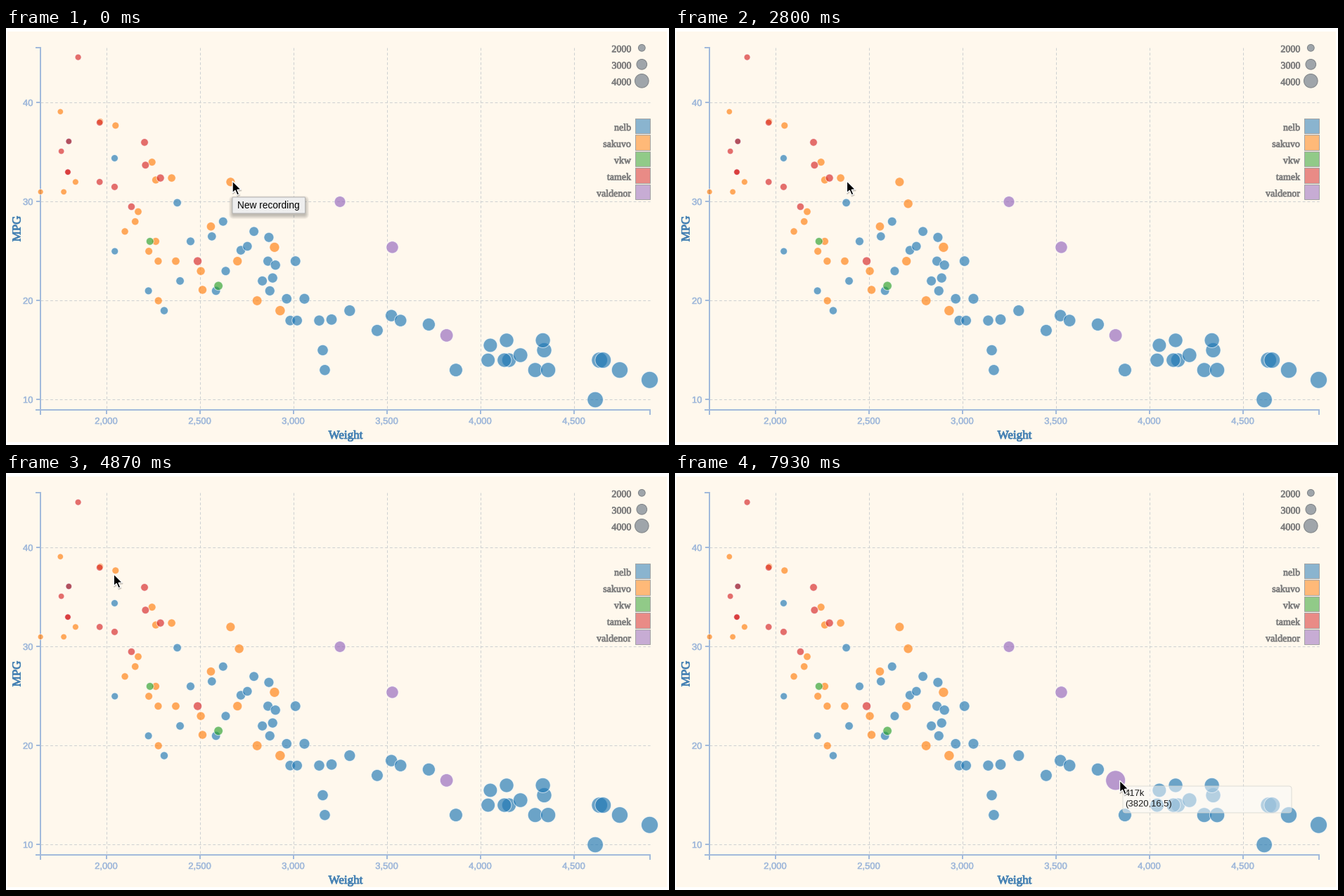
Recreate the animation shown at these times as a matplotlib script. Size 943 px wide and 594 px high, loop 8 s.

```python
import numpy as np
import matplotlib.pyplot as plt
from matplotlib.animation import FuncAnimation
from matplotlib.patches import Circle, FancyBboxPatch, Polygon, Rectangle
from matplotlib.patheffects import Normal, Stroke

W, H = 943, 594
LOOP, STEP = 8000, 50
AXIS, GRID, TITLE, GREY = "#a2badb", "#cdd0d1", "#4682b4", "#808080"
SANS, SERIF = "Liberation Sans", "Liberation Serif"
BLUE, ORANGE, GREEN, RED, PURPLE = "#1f77b4", "#ff7f0e", "#2ca02c", "#d62728", "#9467bd"

# (weight, mpg) per maker
nelb = [
    (1800, 36.1), (2045, 34.4), (2046, 25), (2226, 21), (2310, 19), (2380, 29.9),
    (2395, 22), (2451, 26), (2565, 26.5), (2587, 21), (2625, 28), (2639, 23),
    (2720, 25.1), (2755, 25.5), (2790, 27), (2865, 24), (2870, 26.4), (2835, 22),
    (2875, 21), (2890, 22.3), (2905, 23.6), (3012, 24), (2965, 20.2), (3060, 20.2),
    (2984, 18), (3021, 18), (3139, 18), (3205, 18.1), (3302, 19), (3158, 15),
    (3169, 13), (3449, 17), (3525, 18.5), (3574, 18), (3725, 17.6), (3870, 13),
    (4042, 14), (4054, 15.5), (4141, 16), (4154, 14), (4129, 14), (4215, 14.5),
    (4294, 13), (4363, 13), (4342, 15), (4335, 16), (4638, 14), (4657, 14),
    (4746, 13), (4615, 10), (4906, 12),
]
sakuvo = [
    (1755, 39.1), (1968, 38.1), (2050, 37.7), (1836, 32), (1773, 31), (1649, 31),
    (2245, 34), (2265, 32.2), (2350, 32.4), (2665, 32), (2711, 29.8), (2171, 29),
    (2155, 28), (2100, 27), (2265, 26), (2228, 25), (2278, 24), (2279, 20),
    (2372, 24), (2506, 23), (2560, 27.5), (2515, 21.1), (2702, 24), (2900, 25.4),
    (2807, 20), (2930, 19),
]
vkw = [(2234, 26), (2600, 21.5)]
tamek = [
    (1850, 44.6), (1965, 38), (1800, 36.1), (1760, 35.1), (1795, 33), (1795, 33),
    (1965, 32), (2045, 31.5), (2205, 36), (2210, 33.7), (2290, 32.4), (2135, 29.5),
    (2489, 24),
]
valdenor = [(3250, 30), (3530, 25.4), (3820, 16.5)]

makers = [("nelb", BLUE, nelb), ("sakuvo", ORANGE, sakuvo), ("vkw", GREEN, vkw),
          ("tamek", RED, tamek), ("valdenor", PURPLE, valdenor)]
cars = [(w, m, color) for _, color, rows in makers for w, m in rows]

# start, end, car, label, tooltip corner
hovers = [
    (2850, 3500, (2350, 32.4), "pimelle", (257, 231)),
    (5100, 5750, (1965, 38), "tarno", (154, 150)),
    (7540, 9000, (3820, 16.5), "417k", (637, 446)),
]
# time, x, y of the pointer tip
path = [
    (0, 321.5, 217), (870, 321.5, 217), (1330, 328, 214), (2270, 328, 214),
    (2850, 242, 217), (3200, 238, 214), (3470, 226, 203), (4000, 198, 166),
    (4300, 198, 166), (5100, 139, 136), (5400, 129, 133), (5750, 129, 133),
    (6550, 553, 421), (6730, 553, 421), (7330, 598, 428), (7470, 606, 430),
    (7750, 632, 437), (8000, 632, 437),
]


def px(weight):
    return 142.5 + (weight - 2000) * 0.266


def py(mpg):
    return 106.5 + (40 - mpg) * 14.1


def radius(weight):
    return 4 + (weight - 1649) * 8 / 3257


def smooth(u):
    u = min(max(u, 0), 1)
    return u * u * (3 - 2 * u)


def pointer_at(t):
    for (t0, x0, y0), (t1, x1, y1) in zip(path, path[1:]):
        if t <= t1:
            u = smooth((t - t0) / (t1 - t0))
            return x0 + (x1 - x0) * u, y0 + (y1 - y0) * u
    return path[-1][1:]


def presence(t, start, end):
    return smooth((t - start) / 200) * (1 - smooth((t - end) / 300))


fig = plt.figure(figsize=((W + 1e-4) / 72, (H + 1e-4) / 72), dpi=72, facecolor="white")
ax = fig.add_axes([0, 0, 1, 1])
ax.set_xlim(0, W)
ax.set_ylim(H, 0)
ax.axis("off")


def line(xs, ys, color, width, z, **kw):
    ax.plot(xs, ys, color=color, lw=width, zorder=z, **kw)


def label(x, y, text, size, color, font, bold=0.0, **kw):
    kw.setdefault("ha", "center")
    item = ax.text(x, y, text, fontsize=size, color=color, family=font,
                   va="baseline", **kw)
    if bold:
        item.set_path_effects([Stroke(linewidth=bold, foreground=color), Normal()])
    return item


def box(x, y, w, h, round_by, z, **kw):
    style = f"round,pad=0,rounding_size={round_by}"
    return ax.add_patch(FancyBboxPatch((x, y), w, h, boxstyle=style, zorder=z, **kw))


# panel, grid and axes
ax.add_patch(Rectangle((2, 5), 938, 585.5, fc="#fff8ed", ec="none", zorder=0))
dash = dict(linestyle=(0, (3.8, 3)), dash_capstyle="butt")
for weight in range(2000, 4501, 500):
    x = px(weight)
    line([x, x], [28, 543], GRID, 1, 1, **dash)
    line([x, x], [543.5, 550], AXIS, 2, 2, solid_capstyle="butt")
    label(x, 564, f"{weight:,}", 13, AXIS, SANS, 0.5)
for mpg in (10, 20, 30, 40):
    y = py(mpg)
    line([49, 916], [y, y], GRID, 1, 1, **dash)
    line([42.5, 49], [y, y], AXIS, 2, 2, solid_capstyle="butt")
    label(38.5, y + 4.5, str(mpg), 13, AXIS, SANS, 0.5, ha="right")
line([42.5, 49, 49, 42.5], [28, 28, 544, 544], AXIS, 2, 2, solid_joinstyle="miter")
line([49, 49, 916, 916], [550, 544, 544, 550], AXIS, 2, 2, solid_joinstyle="miter")
label(483, 585, "Weight", 17, TITLE, SERIF, 0.9)
label(20.5, 286, "MPG", 17, TITLE, SERIF, 0.9, rotation=90, rotation_mode="anchor")

# legends
for i, weight in enumerate((2000, 3000, 4000)):
    y = 28.3 + 23.5 * i
    ax.add_patch(Circle((904.3, y), radius(weight), fc="#9fa5aa", ec="#808487",
                        lw=1, zorder=3))
    label(889, y + 6, str(weight), 14, GREY, SERIF, 0.8, ha="right")
for i, (name, color, _) in enumerate(makers):
    y = 129 + 23.5 * i
    ax.add_patch(Rectangle((894.5, y), 21.5, 21.5, fc=color, ec="none", alpha=0.52,
                           zorder=3))
    ax.add_patch(Rectangle((894.5, y), 21.5, 21.5, fc="none", ec="#a3a3a3", lw=1,
                           zorder=3))
    label(889, y + 17, name, 14, GREY, SERIF, 0.8, ha="right")

# data points
base = np.array([radius(w) for w, _, _ in cars])
dots = ax.scatter([px(w) for w, _, _ in cars], [py(m) for _, m, _ in cars],
                  s=(2 * base) ** 2, c=[c for _, _, c in cars], alpha=0.66,
                  linewidths=1, zorder=4)
dots.set_edgecolor((1, 1, 1, 0.8))
where = {(w, m, c): i for i, (w, m, c) in enumerate(cars)}
index = [next(i for k, i in where.items() if k[:2] == h[2]) for h in hovers]

# one tooltip per hovered car
tips = []
for _, _, (w, m), name, (x, y) in hovers:
    tips.append((box(x, y, 240, 38, 4, 6, lw=1),
                 label(x + 3, y + 14, name, 13, "#1c1c1c", SANS, ha="left", zorder=7),
                 label(x + 3, y + 29.3, f"({w},{m:g})", 13, "#1c1c1c", SANS,
                       ha="left", zorder=7)))

# system hint
hint = [(box(322 - g, 242 + 2 - g, 104 + 2 * g, 23 + 2 * g, 2 + g, 8, fc="black",
             ec="none"), 0.045) for g in range(6)]
hint.append((box(322, 241, 103.5, 23, 1, 8.1, fc="#eeeeee", ec="#b4b4b4", lw=1), 1))
hint.append((label(373.5, 257, "New recording", 13.8, "black", SANS, zorder=9), 1))

arrow = np.array([(0, 0), (0, 17), (3.9, 13.4), (6.7, 20), (9.6, 18.8), (6.8, 12.4),
                  (12.2, 12.2)]) + (0.6, 1)
shadow = ax.add_patch(Polygon(arrow, fc="black", ec="black", lw=2, alpha=0.15, zorder=10))
pointer = ax.add_patch(Polygon(arrow, fc="black", ec="white", lw=1.3, zorder=11))


def draw(frame):
    t = frame * STEP
    size = base.copy()
    for (start, end, *_), i, (panel, *texts) in zip(hovers, index, tips):
        k = presence(t, start, end)
        size[i] += (14 - base[i]) * k
        panel.set_facecolor((0.98, 0.98, 0.98, 0.52 * k))
        panel.set_edgecolor((0.84, 0.84, 0.82, 0.8 * k))
        for item in texts:
            item.set_alpha(k)
        for item in (panel, *texts):
            item.set_visible(k > 0)
    dots.set_sizes((2 * size) ** 2)

    fade = 1 - smooth((t - 70) / 330)
    for item, strength in hint:
        item.set_alpha(strength * fade)
        item.set_visible(fade > 0)

    tip = np.array(pointer_at(t))
    pointer.set_xy(arrow + tip)
    shadow.set_xy(arrow + tip + (0.5, 1.5))
    return [dots, pointer, shadow]


anim = FuncAnimation(fig, draw, frames=LOOP // STEP, interval=STEP, repeat=True,
                     repeat_delay=0, init_func=lambda: draw(0), blit=False)
plt.show()
```
